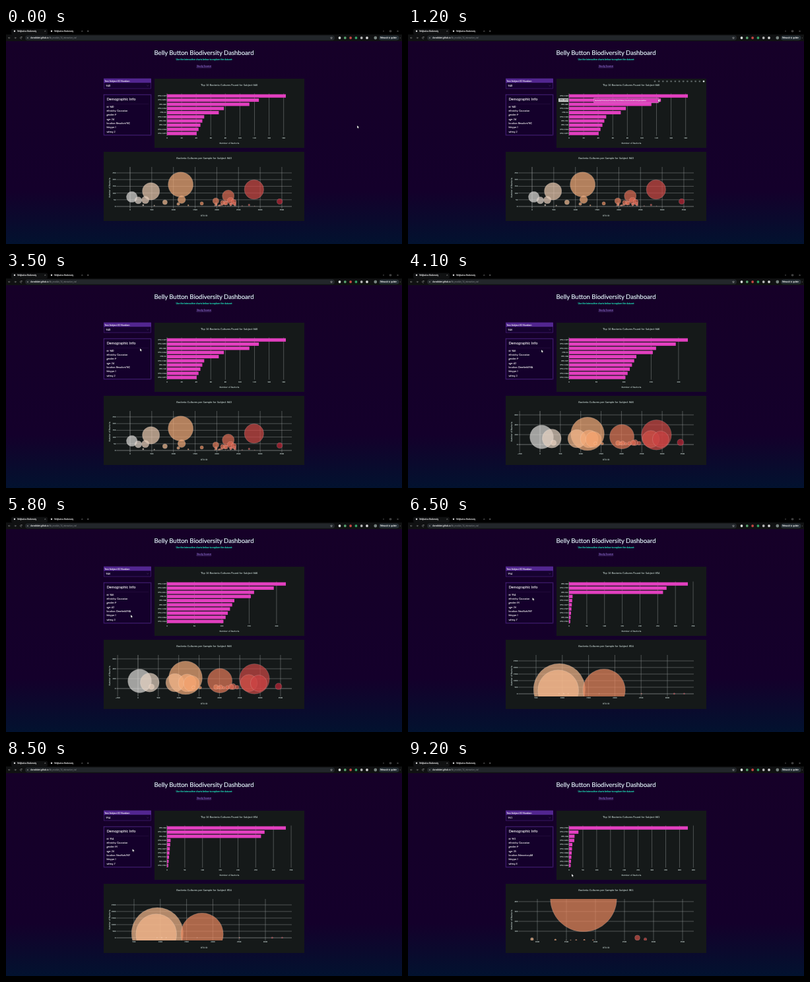
Recreate the animation shown at these times as an HTML page. Size 600 by 328 pixels, loop 9.3 s.

```html
<!DOCTYPE html>
<html lang="en">
<head>
<meta charset="utf-8">
<title>Belly Button Biodiversity Dashboard</title>
<style>
html, body { margin: 0; width: 100%; height: 100%; overflow: hidden; background: #150029; }
svg { display: block; width: 100%; height: 100%; }
text { font-family: Lato, sans-serif; color: #eee; fill: currentColor; stroke: currentColor; stroke-width: .08; white-space: pre; }
.ui { font-family: Roboto, sans-serif; }
.plot text { font-family: "DejaVu Sans", sans-serif; color: #c3d2cf; }
.grid { stroke: #a6abab; stroke-width: .4; }
.zero { stroke: #c4c8c8; stroke-width: .5; }
.mid { text-anchor: middle; }
.end { text-anchor: end; }
</style>
</head>
<body>
<svg viewBox="0 0 600 328" preserveAspectRatio="none">
  <defs>
    <linearGradient id="sky" x2="0" y2="1">
      <stop stop-color="#160028"/><stop offset=".74" stop-color="#14002b"/><stop offset="1" stop-color="#02122f"/>
    </linearGradient>
    <clipPath id="plotArea"><rect x="167" y="211" width="266" height="63"/></clipPath>
  </defs>
  <rect y="20" width="600" height="308" fill="url(#sky)"/>
  <g id="browser"></g>

  <text class="mid" x="300" y="40.7" font-size="9.55" style="color:#e4f8fb;stroke-width:.16">Belly Button Biodiversity Dashboard</text>
  <text class="mid" x="300" y="48.6" font-size="3.5" font-weight="700" style="color:#1fdcb4">Use the interactive charts below to explore the dataset</text>
  <text class="mid" x="300" y="58.8" font-size="3.85" text-decoration="underline" style="color:#9272d6">Study Source</text>

  <rect x="148.3" y="77" width="71.4" height="15" fill="#160230" stroke="#572a94" stroke-width=".5"/>
  <rect x="148" y="76.8" width="72" height="6.4" fill="#522690"/>
  <text x="149.3" y="81.7" font-size="3.6">Test Subject ID Number:</text>
  <path d="M213.5 87l1.2 1.1 1.2-1.1" fill="none" stroke="#6b5686" stroke-width=".4"/>
  <rect x="148.3" y="101.3" width="71.4" height="61.4" fill="none" stroke="#552a98" stroke-opacity=".3" stroke-width="1.8"/>
  <rect x="148.3" y="101.3" width="71.4" height="61.4" fill="#14002b" stroke="#5c3099" stroke-width=".5"/>
  <text x="152.4" y="110.2" font-size="5.6">Demographic Info</text>
  <path d="M152 115.3H216" stroke="#38204f" stroke-width=".4"/>
  <g id="info"></g>

  <rect x="225" y="77" width="227" height="105" fill="#151919"/>
  <rect x="148" y="188" width="304" height="105" fill="#151919"/>
  <g id="charts" class="plot"></g>
  <g id="modebar"></g>
  <g id="tooltip" class="plot">
    <rect x="228" y="106.8" width="15" height="5.4" fill="#c9cccc"/>
    <text class="end" x="242.3" y="110.4" font-size="2.5" style="color:#333">OTU 2859</text>
    <path d="M281.5 106.5H379.5V108.3L382.8 110 379.5 111.7V113.7H281.5Z" fill="#d93bb8" stroke="#fff" stroke-width=".25"/>
    <text x="283" y="111.2" font-size="2.15" style="color:#fff">Bacteria;Firmicutes;Clostridia;Clostridiales;IncertaeSedisXI;Peptoniphilus</text>
  </g>
  <path id="cursor" d="M0 0V4.2L1 3.3 1.7 4.8 2.4 4.5 1.8 3.1H3.1Z" fill="#fff" stroke="#222" stroke-width=".25"/>
</svg>
<script>
const $ = id => document.getElementById(id);
const LOOP = 9300, STEP = 100, OTU_MAX = 3500;

// axes: [pixel of zero, pixels per unit, tick step]
// counts: largest values; later bars fall linearly from tail by drop; specks: [how many, largest]
const subjects = [
  { from: 0, id: 940, gender: 'F', age: 24, location: 'Beaufort/NC', wfreq: 2, barStep: 20,
    x: [188, .0657, 500], y: [271, -.204, 50],
    otus: [1167, 2859, 482, 2264, 41, 1189, 352, 189, 2318, 1977],
    counts: [163, 126, 113, 78, 71], tail: 51, drop: 2.6, specks: [32, 37] },
  { from: 3900, id: 946, gender: 'F', age: 42, location: 'Deerfield/MA', wfreq: 3, barStep: 50,
    x: [200, .0617, 500], y: [262, -.075, 200],
    otus: [1167, 2859, 2011, 41, 288, 907, 1208, 2722, 2964, 1314],
    counts: [217, 195, 159, 153], tail: 123, drop: 4, specks: [12, 43] },
  { from: 6300, id: 954, gender: 'M', age: 26, location: 'NewYork/NY', wfreq: 7, barStep: 50,
    x: [154.2, .0796, 500], y: [270, -.02, 500],
    otus: [944, 1795, 922, 3130, 3320],
    counts: [335, 275, 265], tail: 10, drop: 1.1, specks: [0, 0] },
  { from: 8700, id: 961, gender: 'F', age: 35, location: 'Edmonton,AB', wfreq: 8, barStep: 50,
    x: [108, .088, 500], y: [275, -.15, 100],
    otus: [1795, 2722, 908, 2859, 1310],
    counts: [430, 34, 20, 19], tail: 12, drop: 1.2, specks: [0, 0] },
];

// time, x, y of the pointer's resting points
const path = [[0, 532, 148], [1200, 379, 108], [2200, 266, 238], [3500, 203, 116], [4200, 202, 118],
  [5000, 330, 180], [5800, 189, 150], [7300, 188, 92], [8800, 192, 140], [9200, 248, 173]];

const text = (x, y, size, str, cls = '', extra = '') =>
  `<text x="${x}" y="${y}" font-size="${size}" class="${cls}" ${extra}>${str}</text>`;
const rect = (x, y, w, h, fill, r = 0) =>
  `<rect x="${x}" y="${y}" width="${w}" height="${h}" rx="${r}" fill="${fill}"/>`;
const line = (x1, y1, x2, y2, cls) => `<path class="${cls}" d="M${x1} ${y1}L${x2} ${y2}"/>`;
const dot = (x, y, r, fill, extra = '') => `<circle cx="${x}" cy="${y}" r="${r}" fill="${fill}" ${extra}/>`;

function seeded(seed) {
  return () => (seed = (seed * 16807) % 2147483647) / 2147483647;
}

function ticks([zero, scale, step], low, high) {
  const found = [];
  for (let v = -step; v <= 4000; v += step) {
    const at = zero + v * scale;
    if (at >= low && at <= high) found.push([v, at]);
  }
  return found;
}

const reds = [[0, 220, 220, 220], [.2, 245, 195, 157], [.4, 245, 160, 105], [1, 190, 34, 54]];
function redScale(p) {
  const i = Math.max(1, reds.findIndex(s => s[0] >= p));
  const a = reds[i - 1], b = reds[i], k = (p - a[0]) / (b[0] - a[0]);
  return `rgb(${[1, 2, 3].map(c => Math.round(a[c] + (b[c] - a[c]) * k))})`;
}

// ten bars, then small bubbles scattered over the range and crowded around 2200
function makeSamples({ id, otus, counts, tail, drop, specks: [n, largest] }) {
  const random = seeded(id * 7919);
  const bars = Array.from({ length: 10 }, (_, i) =>
    [otus[i] ?? Math.round(800 + 1800 * random()), counts[i] ?? tail - drop * (i - counts.length)]);
  const specks = Array.from({ length: n }, (_, i) => {
    const otu = i % 2 ? 1950 + 500 * random() : 150 + 2800 * random();
    return [i ? otu : 3450, largest * .92 ** i];
  });
  return [...bars, ...specks];
}

function barChart(s, data) {
  const scale = 180 / data[0][1];
  let out = text(338.5, 88.3, 3.65, `Top 10 Bacteria Cultures Found for Subject ${s.id}`, 'mid');
  for (const [v, x] of ticks([244, scale, s.barStep], 244, 433))
    out += line(x, 99.5, x, 163.5, v ? 'grid' : 'zero') + text(x, 167.6, 2.55, v, 'mid');
  data.slice(0, 10).forEach(([otu, count], i) => {
    const y = 103.2 + i * 6.33;
    out += rect(244, y - 2.55, count * scale, 5.1, '#e23fbf') + text(243, y + .9, 2.55, 'OTU ' + otu, 'end');
  });
  return out + text(338.5, 175.8, 3.05, 'Number of Bacteria', 'mid');
}

function bubbleChart(s, data) {
  let out = text(300, 199.3, 3.7, `Bacteria Cultures per Sample for Subject ${s.id}`, 'mid');
  for (const [v, x] of ticks(s.x, 167, 432))
    out += line(x, 211, x, 274, v ? 'grid' : 'zero') + text(x, 277.3, 2.55, v < 0 ? '−' + -v : v, 'mid');
  for (const [v, y] of ticks(s.y, 211, 274))
    out += line(167, y, 433, y, v ? 'grid' : 'zero') + text(166.3, y + .9, 2.55, v, 'end');
  const bubbles = data.map(([otu, count]) => dot(s.x[0] + otu * s.x[1], s.y[0] + count * s.y[1],
    count * .117, redScale(otu / OTU_MAX), 'opacity=".7"'));
  return out + `<g clip-path="url(#plotArea)" stroke="#fff" stroke-width=".22">${bubbles.join('')}</g>` +
    text(300, 286.4, 3.05, 'OTU ID', 'mid') +
    text(0, 0, 3.05, 'Number of Bacteria', 'mid', 'transform="translate(158 242.5) rotate(-90)"');
}

function showSubject(s) {
  const rows = [`id: ${s.id}`, 'ethnicity: Caucasian', `gender: ${s.gender}`, `age: ${s.age}`,
    `location: ${s.location}`, 'bbtype: I', `wfreq: ${s.wfreq}`];
  const data = makeSamples(s);
  $('info').innerHTML = text(151.6, 89.2, 3.75, s.id) +
    rows.map((row, i) => text(152.4, 120.6 + i * 6.37, 3.65, row)).join('');
  $('charts').innerHTML = barChart(s, data) + bubbleChart(s, data);
}

function drawBrowser() {
  const ink = d => `<path d="${d}" fill="none" stroke="#ccc" stroke-width=".4"/>`;
  let out = rect(0, 0, 600, 20, '#000') + rect(0, 9.8, 600, 10.2, '#101112') +
    rect(29, 11.3, 469, 7.4, '#22262a', 3.7) + rect(8, 1.5, 55, 8.5, '#101112', 2);
  for (const x of [12, 68])
    out += dot(x + 1, 4.7, 1.2, '#ddd') + text(x + 5.5, 5.8, 2.75, 'Bellybutton Biodiversity', 'ui') +
      ink(`M${x + 46.5} 4l1.6 1.6m0-1.6l-1.6 1.6`);
  out += ink('M123 4.8h2.4M124.2 3.6v2.4M571 4.8h2M581.5 3.8h2v2h-2ZM592.5 3.8l2 2m0-2l-2 2');
  out += ink('M6.5 15H3.7l1.2-1.2M3.7 15l1.2 1.2M12.5 15h2.8l-1.2-1.2M15.3 15l-1.2 1.2M24 14.2a1.4 1.4 0 1 0 .1 1.4M24.2 13v1.2h-1.2');
  out += dot(32.8, 15, 1.1, '#777') + text(37, 16.1, 3.05,
    'dorvalinket.github.io<tspan style="fill:#8d9195;stroke:none">/bb_module_14_interactive_viz/</tspan>', 'ui');
  out += ink('M493 13.6l.5 1h1l-.8.7.3 1.1-1-.6-1 .6.3-1.1-.8-.7h1Z');
  ['#d9dedb', '#58a06d', '#c44644', '#34a167', '#b5b5b5', '#d6d6d6']
    .forEach((c, i) => out += dot(505.5 + i * 8.3, 15, 1.9, c));
  out += dot(559.8, 15, 2.4, '#77837f') + rect(565, 11.5, 30.5, 7, '#273036', 3.5) +
    text(567.3, 16, 2.85, 'Relaunch to update', 'ui') + dot(597.5, 15, .4, '#ccc');
  $('browser').innerHTML = out;
}

function drawModebar() {
  let out = '';
  for (let i = 0; i < 13; i++)
    out += rect(372.8 + i * 6.17, 79.8, 2.4, 2.4, i < 12 ? '#596161' : '#d5dede', i % 3 * .4);
  $('modebar').innerHTML = out;
}

function cursorAt(t) {
  const i = path.findIndex(p => p[0] > t);
  if (i < 0) return path[path.length - 1].slice(1);
  const [t0, x0, y0] = path[i - 1], [t1, x1, y1] = path[i];
  const p = (t - t0) / (t1 - t0), k = p * p * (3 - 2 * p);
  return [x0 + (x1 - x0) * k, y0 + (y1 - y0) * k];
}

const show = (id, on) => $(id).setAttribute('visibility', on ? 'visible' : 'hidden');
let current;
function frame() {
  const t = Math.floor(performance.now() % LOOP / STEP) * STEP;
  const subject = subjects.filter(s => s.from <= t).pop();
  if (subject !== current) showSubject(current = subject);
  const [x, y] = cursorAt(t);
  $('cursor').setAttribute('transform', `translate(${x} ${y})`);
  show('modebar', x > 250 && x < 452 && y > 77 && y < 182);
  show('tooltip', x > 250 && x < 383 && y > 106 && y < 113);
  requestAnimationFrame(frame);
}

drawBrowser();
drawModebar();
frame();
</script>
</body>
</html>
```
